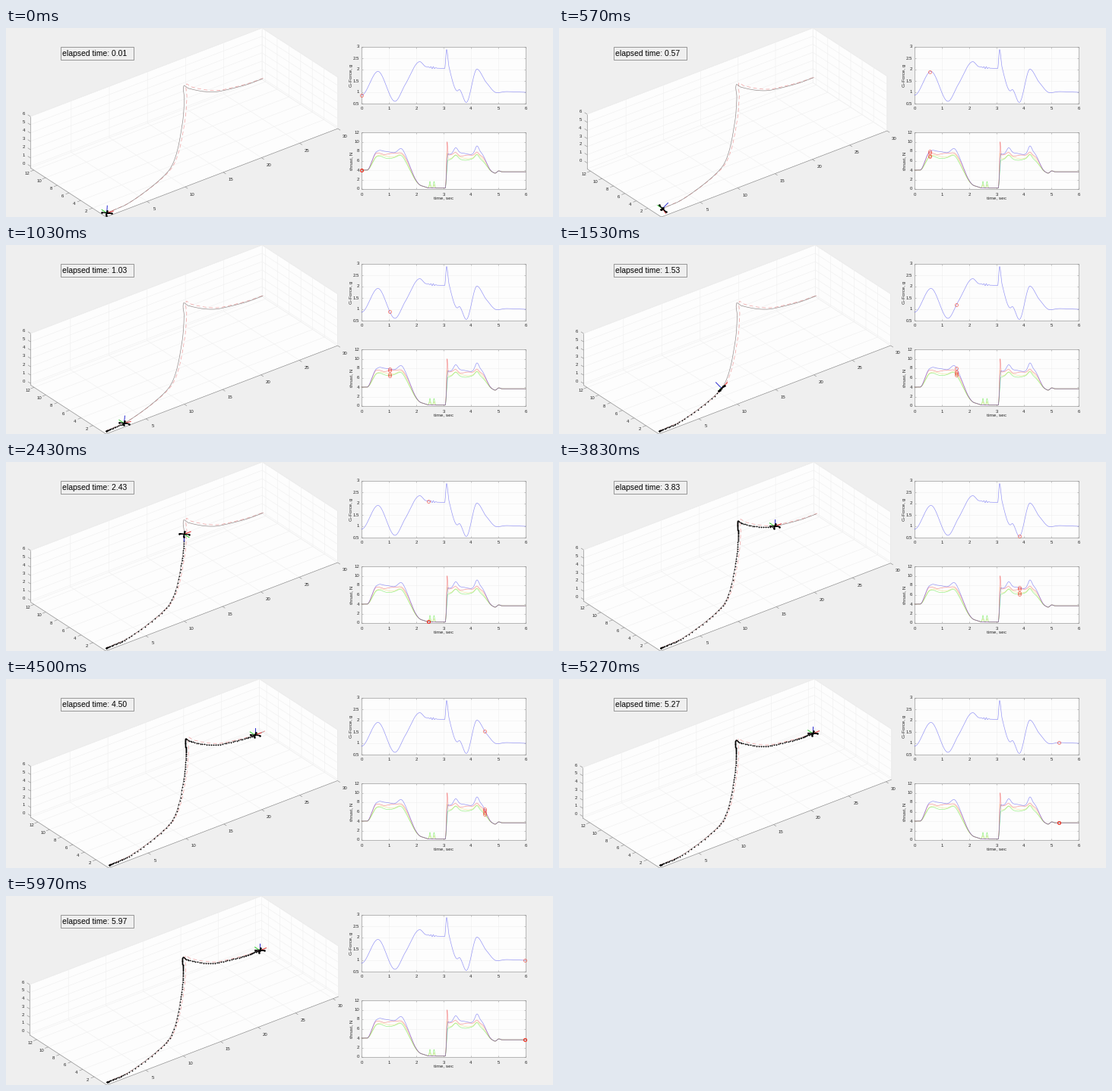
Animation of 720x250 px, one loop 6.01 s. Source, as a matplotlib script:

```python
import numpy as np
import matplotlib.pyplot as plt
from matplotlib.animation import FuncAnimation
from matplotlib.collections import LineCollection
from matplotlib.patches import Polygon, Rectangle

plt.rcParams["font.family"] = "Liberation Sans"

W, H, LOOP, FRAMES = 720, 250, 6010, 360
FPS, STEPS = 30, 180
PX = 0.72             # points per pixel at 100 dpi
INK, EDGE, PAPER = "#262626", "#8c8c8c", "#fdfdfd"


def ease(t, a, b):
    u = np.clip((t - a) / (b - a), 0, 1)
    return u * u * (3 - 2 * u)


def bump(t, center, width):
    return np.exp(-((t - center) / width) ** 2)


def smooth(t, keys):
    """Monotone cubic interpolation through rows of (time, values...)."""
    k = np.array(keys, float)
    x, y = k[:, 0], k[:, 1:]
    h = np.diff(x)[:, None]
    d = np.diff(y, axis=0) / h
    prod, total = d[:-1] * d[1:], d[:-1] + d[1:]
    m = np.zeros_like(y)
    m[1:-1] = np.where(prod > 0, 2 * prod / np.where(prod > 0, total, 1), 0)
    t = np.clip(np.atleast_1d(t), x[0], x[-1])
    i = np.clip(np.searchsorted(x, t, "right") - 1, 0, len(x) - 2)
    u = (t - x[i])[:, None] / h[i]
    a, b = y[i], y[i + 1]
    return (a + (b - a) * u * u * (3 - 2 * u)
            + h[i] * u * (1 - u) * (m[i] * (1 - u) - m[i + 1] * u))


# Flight data

def flight(t):
    """World position: take-off, climb, turn at 3.1 s, descent, hover."""
    return smooth(t, [(.4, 0, 0, 0), (1, 2.2, .1, 0), (1.53, 9.1, 1.3, 1.3),
                      (2, 12.7, 3.7, 4.35), (2.43, 14.45, 5.6, 6),
                      (3.1, 16.5, 8.36, 5.7), (3.3, 17.85, 9.3, 4.5),
                      (3.83, 24.2, 12.1, .65), (4.4, 28.4, 12.4, 0),
                      (5, 29.9, 12.4, 0)])


def attitude(t):
    """Rows are the body axes: pitch down, pitch up, then a full roll."""
    pitch = np.radians(60 * bump(t, .57, .35) - 30 * bump(t, 1.53, .35))
    roll = -np.pi * (ease(t, 1.2, 2.3) + ease(t, 2.9, 3.4))
    cp, sp, cr, sr = np.cos(pitch), np.sin(pitch), np.cos(roll), np.sin(roll)
    return np.array([[cp, 0, -sp], [sp * sr, cr, cp * sr], [sp * cr, -sr, cp * cr]])


def g_force(t):
    g = smooth(t, [(0, .87), (.6, 1.92), (1.22, .6), (1.6, 1.35), (2.13, 2.35),
                   (2.35, 2.13), (3.04, 2.05), (3.11, 2.88), (3.2, 2.1),
                   (3.5, 1.06), (3.57, 1.12), (3.83, .55), (4.22, 2.02),
                   (4.55, 1.45), (4.95, .98), (5.3, 1.03), (6, 1)])[:, 0]
    return g + .05 * bump(t, 2.6, .1) * np.sin(70 * t)


def rotor(level, swell, spike, flutter, phase):
    """Thrust curve: powered twice, coasting between, settling to hover."""
    def thrust(t):
        off, on = ease(t, 1.45, 2.2), ease(t, 3.06, 3.16)
        power = ease(t, .2, .55) - off + on - ease(t, 4.35, 4.8)
        gusts = (.5 * bump(t, .65, .13) + .8 * bump(t, 1.42, .14)
                 + 1.5 * bump(t, 3.44, .11) + 1.8 * bump(t, 4.22, .1))
        settle = .2 * bump(t, 5.02, .06) - .3 * bump(t, 4.88, .07)
        blips = bump(t, 2.5, .03) + bump(t, 2.65, .03)
        return (4 - 3.8 * off + 3.45 * on + level * power + swell * gusts + settle
                + spike * bump(t, 3.125, .025) + flutter * blips
                + .5 * bump(t, 2.15, .2) + .15 * power * np.sin(9 * t + phase))
    return thrust


fig = plt.figure(figsize=(7.2, 2.5), dpi=100, facecolor="#efefef")
ax = fig.add_axes([0, 0, 1, 1])
ax.set(xlim=(0, W), ylim=(H, 0))
ax.axis("off")


def label(x, y, s, size=6, **kw):
    kw = {"ha": "center", "va": "center", "color": INK, **kw}
    return ax.text(x, y, s, fontsize=size * PX, **kw)


def line(color, width, **kw):
    return ax.plot([], [], color=color, lw=width * PX, **kw)[0]


def dots(size):
    return line("k", 0, ls="", marker="o", ms=size * PX, mew=0)


def segments(color, width, data=()):
    c = LineCollection(data, colors=color, linewidths=width * PX)
    return ax.add_collection(c)


class Chart:
    """A 2D plot placed in pixels, with ring markers riding its curves."""
    X0, X1, TALL = 468, 684, 75

    def __init__(self, top, lo, hi, step, name, curves):
        self.top, self.lo, self.hi = top, lo, hi
        x0, x1, base = self.X0, self.X1, top + self.TALL
        xs = [self.x(i) for i in range(7)]
        values = np.arange(lo, hi + step / 2, step)
        ys = [self.y(v) for v in values]
        ax.add_patch(Rectangle((x0, top), x1 - x0, self.TALL,
                               fc=PAPER, ec=EDGE, lw=.6 * PX))
        segments("#f0f0f0", .6, [[(x, top), (x, base)] for x in xs[1:-1]]
                 + [[(x0, y), (x1, y)] for y in ys[1:-1]])
        ticks = [[(x, e), (x, e + s)] for x in xs for e, s in ((top, 2), (base, -2))]
        ticks += [[(e, y), (e + s, y)] for y in ys for e, s in ((x0, 2), (x1, -2))]
        segments(EDGE, .5, ticks)
        for i, x in enumerate(xs):
            label(x, base + 7, str(i))
        for v, y in zip(values, ys):
            label(x0 - 3, y, f"{v:g}", ha="right")
        label(454.5, top + self.TALL / 2, name, 6.4, rotation=90)
        t = np.linspace(0, 6, 900)
        for color, curve in curves:
            line(color, .65, alpha=.6).set_data(self.x(t), self.y(curve(t)))
        self.curves = [curve for _, curve in curves]
        self.marks = line("#f03020", 0, ls="", marker="o", ms=4 * PX,
                          mfc="none", mew=.7 * PX, alpha=.75)

    def x(self, t):
        return self.X0 + t * (self.X1 - self.X0) / 6

    def y(self, v):
        return self.top + (self.hi - v) / (self.hi - self.lo) * self.TALL

    def update(self, t):
        ys = [self.y(float(np.squeeze(curve(t)))) for curve in self.curves]
        self.marks.set_data([self.x(t)] * len(ys), ys)


# Orthographic view: screen direction of each unit axis
AZ, EL = np.radians(37.5), np.radians(30)
VIEW = np.array([[np.cos(AZ), -np.sin(AZ) * np.sin(EL)],
                 [-np.sin(AZ), -np.cos(AZ) * np.sin(EL)],
                 [0, -np.cos(EL)]])
CENTER, TALL = np.array([234.4, 125]), 250
LOW, HIGH = np.full(3, -.2), np.array([30, 12.6, 6])
ARM, ROTORS = .85, .35 * np.array([(1, 1, 0), (-1, -1, 0), (1, -1, 0), (-1, 1, 0)])
TICKS = [range(5, 31, 5), range(2, 13, 2), range(0, 7)]
LABEL_GAP = [(9.5, 10), (-8.5, 4.5), (-9, -3)]

box = ax.add_patch(Polygon([(0, 0)] * 3, fc=PAPER, ec="#e4e4e4", lw=.6 * PX))
grid = segments("#f0f0f0", .6)
frame = segments(EDGE, .6)
tick_text = [[label(0, 0, str(v)) for v in vals] for vals in TICKS]
planned = line("#f0a0a0", .7, dashes=(7, 5))
track = line("#908686", .65)
trail = dots(1.7)
arms = [line(c, 1) for c in ("#e03030", "#30d030", "#3030d0")]
body = line("k", 1.3)
hubs = dots(2.6)

ax.add_patch(Rectangle((72, 25), 96, 17, fc="#efefef", ec="#606060", lw=.6 * PX))
clock = label(74.5, 37, "", 10.4, ha="left", va="baseline", color="k")

charts = [
    Chart(25, .5, 3, .5, "G-Force, g", [("#4848f0", g_force)]),
    Chart(138, 0, 12, 2, "thrust, N", [
        ("#e8d860", rotor(2.9, .4, 2.5, .7, 1)),
        ("#50e830", rotor(2.6, .5, 0, 1.4, 2)),
        ("#f04848", rotor(3.4, .5, 4.5, 0, 4)),
        ("#4848f0", rotor(3.8, .9, 0, 0, 0)),
    ]),
]
label(576, 224.5, "time, sec", 6.5)

flown = flight(np.arange(STEPS) / FPS)
fine = np.linspace(0, 6, 400)
full = flight(fine)
plan = full + .35 * np.sin(np.pi * fine / 6)[:, None] * (1, 0, .2)


def update(i):
    step = min(int((i + 1) * LOOP / FRAMES * FPS / 1000), STEPS - 1)
    t = step / FPS
    pos, axes = flown[step], attitude(t)
    tips, props = pos + ARM * axes, pos + ROTORS @ axes

    # The box stretches to hold the drone and is scaled to fit the height
    solid = np.vstack([LOW, HIGH, tips, props])
    lo, hi = solid.min(0), solid.max(0)
    size = hi - lo
    scale = TALL / (size @ -VIEW[:, 1])
    wide = scale * (size @ np.abs(VIEW[:, 0]))
    near = CENTER + (scale * size[1] * np.sin(AZ) - wide / 2, TALL / 2)

    def proj(points):
        return near + scale * ((np.asarray(points) - lo) @ VIEW)

    (x0, y0, z0), (x1, y1, z1) = lo, hi
    outline = proj([(x0, y0, z0), (x0, y1, z0), (x0, y1, z1),
                    (x1, y1, z1), (x1, y0, z1), (x1, y0, z0)])
    box.set_xy(outline)

    back = (x1, y1, z0)
    mesh = [[back, corner] for corner in ((x0, y1, z0), (x1, y0, z0), (x1, y1, z1))]
    mesh += [[(v, y0, z0), (v, y1, z0), (v, y1, z1)] for v in TICKS[0]]
    mesh += [[(x0, v, z0), (x1, v, z0), (x1, v, z1)] for v in TICKS[1]]
    mesh += [[(x0, y1, v), (x1, y1, v), (x1, y0, v)] for v in TICKS[2]]
    grid.set_segments([proj(m) for m in mesh])

    edges = [outline[[0, 1]], outline[[0, 5]], outline[[1, 2]]]
    anchors = [(0, y0, z0), (x0, 0, z0), (x0, y1, 0)]
    outward = [-VIEW[1], -VIEW[0], VIEW[1]]
    for n, (anchor, way, gap) in enumerate(zip(anchors, outward, LABEL_GAP)):
        for v, text in zip(TICKS[n], tick_text[n]):
            p = proj(anchor + v * np.eye(3)[n])
            edges.append([p, p + 5.5 * way])
            text.set_position(p + gap)
    frame.set_segments(edges)

    for artist, pts in ((planned, plan), (track, full), (trail, flown[:step + 1]),
                        (body, [props[0], props[1], pos, props[2], props[3]]),
                        (hubs, props)):
        artist.set_data(*proj(pts).T)
    for arm, tip in zip(arms, tips):
        arm.set_data(*proj([pos, tip]).T)

    for chart in charts:
        chart.update(t)
    clock.set_text(f"elapsed time: {max(t, .01):.2f}")
    return []


anim = FuncAnimation(fig, update, frames=FRAMES, interval=LOOP / FRAMES,
                     init_func=lambda: update(0), repeat=True, repeat_delay=0)
plt.show()
```
